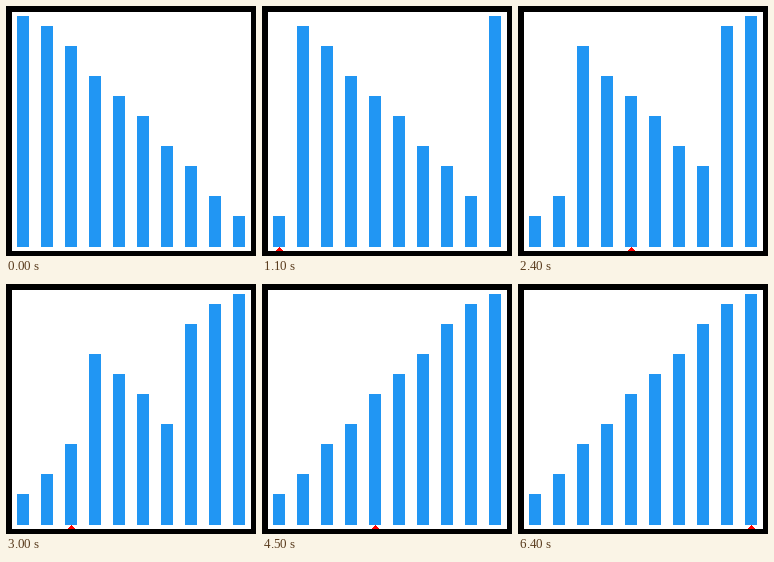
Animation, 250 px wide and 250 px high, one loop 6500 ms. Source, as an HTML page:

```html
<!DOCTYPE html>
<html lang="en">
<head>
<meta charset="utf-8">
<title>Selection sort</title>
<style>
  html, body { margin: 0; width: 100%; height: 100%; overflow: hidden; background: #000; }
  svg { display: block; width: 250px; height: 250px; shape-rendering: crispEdges; }
</style>
</head>
<body>
<svg viewBox="0 0 250 250">
  <rect x="6" y="6" width="239" height="239" fill="#fff"/>
</svg>
<script>
const STEP = 100, PITCH = 24, FLOOR = 241;
const tops = [10, 20, 40, 70, 90, 110, 140, 160, 190, 210];
const last = tops.length - 1;
const svg = document.querySelector('svg');

function add(tag, attrs) {
  const el = document.createElementNS('http://www.w3.org/2000/svg', tag);
  for (const name in attrs) el.setAttribute(name, attrs[name]);
  return svg.appendChild(el);
}

// Each state holds the bar order and the column under the pointer.
function selectionSort() {
  const order = tops.map((_, i) => i);
  const states = [];
  const record = pointer => states.push({ order: [...order], pointer });

  record(-2); // pointer off stage
  for (let i = 0; i < last; i++) {
    let min = i;
    for (let j = i; j <= last; j++) {
      if (tops[order[j]] > tops[order[min]]) min = j;
      record(j);
    }
    [order[i], order[min]] = [order[min], order[i]];
    record(i);
  }
  record(last);
  return states;
}

const states = selectionSort();

function play(el, columns) {
  const count = columns.length;
  const frames = columns.map((column, k) => ({
    offset: Math.max(0, k / count - 1e-6),
    transform: `translateX(${column * PITCH}px)`,
    easing: 'step-end'
  }));
  frames.push({ ...frames[count - 1], offset: 1 });
  el.animate(frames, { duration: count * STEP, iterations: Infinity }).startTime = 0;
}

tops.forEach((top, id) => {
  const bar = add('rect', { x: 11, y: top, width: 12, height: FLOOR - top, fill: '#2196f3' });
  play(bar, states.map(s => s.order.indexOf(id)));
});

// Pointer: four rows, 1 to 7 pixels wide
const rows = [0, 1, 2, 3].map(r => `M${17 - r} ${FLOOR + r}h${2 * r + 1}v1h${-2 * r - 1}z`);
play(add('path', { d: rows.join(''), fill: '#f00' }), states.map(s => s.pointer));
</script>
</body>
</html>
```
